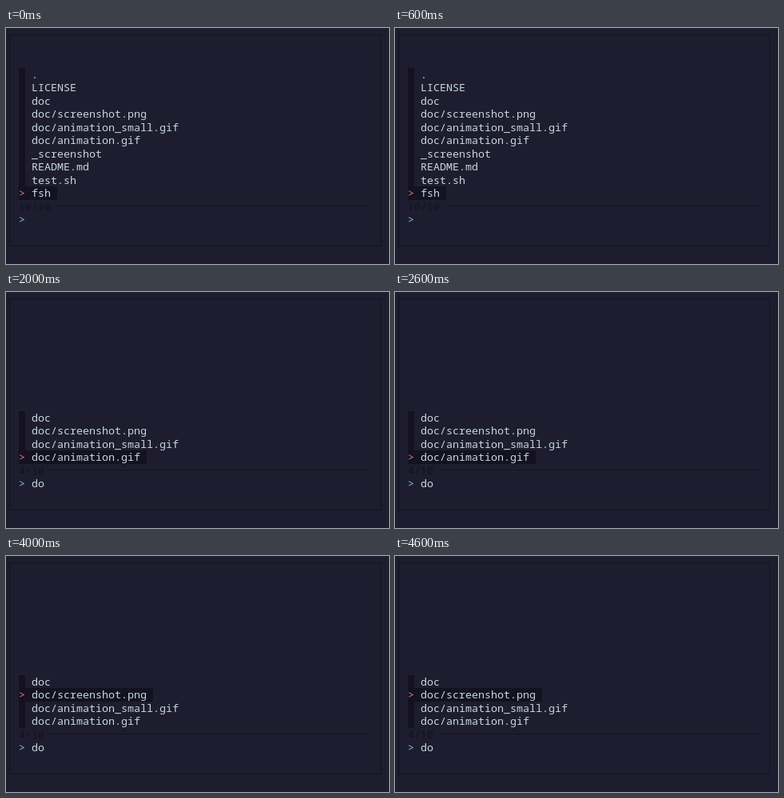
These frames come from a looping animation (479x295 px, 5000 ms). An HTML page with a canvas:

```html
<!DOCTYPE html>
<html lang="en">
<head>
<meta charset="utf-8">
<title>Fuzzy file finder</title>
<style>
html, body { margin: 0; width: 100%; height: 100%; overflow: hidden; background: #1e1d2f; }
canvas { display: block; }
</style>
</head>
<body>
<canvas id="term" width="479" height="295"></canvas>
<script>
const ctx = document.getElementById('term').getContext('2d');
const CELL = 8, LINE = 16.5, STEP = 1000;
const BG = '#1e1d2f', DARK = '#141220', TEXT = '#c6d8e0', RED = '#e0787f', BLUE = '#7cc5e0';

const files = ['.', 'LICENSE', 'doc', 'doc/screenshot.png', 'doc/animation_small.gif',
  'doc/animation.gif', '_screenshot', 'README.md', 'test.sh', 'fsh'];

// Each step: the typed query and how far the pointer has moved up.
const steps = [['', 0], ['d', 0], ['do', 0], ['do', 1], ['do', 2]];

const rowTop = row => Math.round(row * LINE);

function fill(x, y, w, h, color) {
  ctx.fillStyle = color;
  ctx.fillRect(x, y, w, h);
}

function cells(col, row, count) {
  fill(col * CELL, rowTop(row), count * CELL, rowTop(row + 1) - rowTop(row), DARK);
}

function write(text, col, row, color) {
  ctx.fillStyle = color;
  ctx.fillText(text, col * CELL, Math.round(row * LINE + 13));
}

function draw([query, up]) {
  fill(0, 0, 479, 295, BG);
  ctx.font = '13.333px "Noto Sans Mono", "DejaVu Sans Mono", monospace';
  ctx.strokeStyle = DARK;
  ctx.strokeRect(4.5, 8.5, 464, 264);

  const found = files.filter(name => name.toLowerCase().includes(query));
  found.forEach((name, i) => {
    const row = 13 - found.length + i;
    const selected = i === found.length - 1 - up;
    cells(2, row, selected ? name.length + 3 : 1);
    if (selected) write('>', 2, row, RED);
    write(name, 4, row, TEXT);
  });

  const count = found.length + '/' + files.length;
  const lineX = (count.length + 3) * CELL;
  write(count, 2, 13, DARK);
  fill(lineX, 222, 456 - lineX, 1, DARK);
  write('>', 2, 14, BLUE);
  write(query, 4, 14, TEXT);
}

const start = performance.now();
function tick() {
  const time = performance.now() - start;
  draw(steps[Math.floor(time / STEP) % steps.length]);
  requestAnimationFrame(tick);
}
tick();
</script>
</body>
</html>
```
